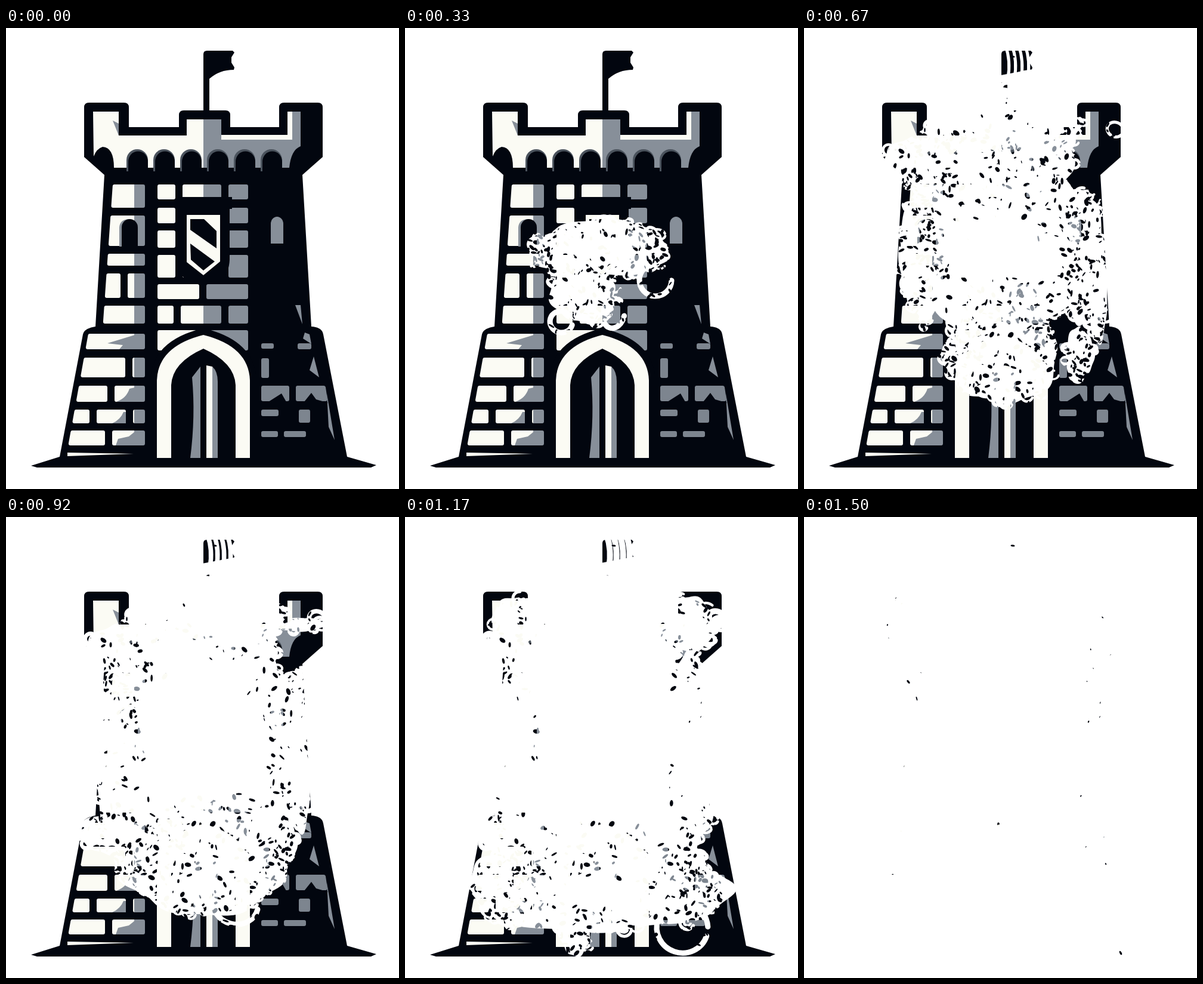
Animation of 659 by 772 pixels, one loop 1.58 s. Source, as an HTML page with a canvas:

```html
<!DOCTYPE html>
<html lang="en">
<head>
<meta charset="utf-8">
<title>Tower</title>
<style>
  html, body { margin: 0; width: 100%; height: 100%; overflow: hidden; background: #fff; }
  svg, canvas { position: absolute; left: 0; top: 0; width: 100%; height: 100%; display: block; }
  .ink { fill: #02060f; }
  .pale { fill: #fbfbf4; }
  .grey { fill: #878f99; }
  .brick { stroke-width: 6; stroke-linejoin: round; }
  .left { fill: url(#l); stroke: url(#l); }
  .mid { fill: url(#m); stroke: url(#m); }
  .dim { fill: #7d858f; stroke: #7d858f; }
</style>
</head>
<body>
<svg viewBox="0 0 659 772" preserveAspectRatio="none">
  <defs>
    <linearGradient id="l" gradientUnits="userSpaceOnUse" x1="0" x2="430" y1="0" y2="0">
      <stop offset=".5" stop-color="#fbfbf4"/><stop offset=".5" stop-color="#878f99"/>
    </linearGradient>
    <linearGradient id="m" gradientUnits="userSpaceOnUse" x1="0" x2="662" y1="0" y2="0">
      <stop offset=".5" stop-color="#fbfbf4"/><stop offset=".5" stop-color="#878f99"/>
    </linearGradient>
  </defs>

  <!-- flag and silhouette -->
  <path class="ink" d="M331 142V44Q331 38 337 38H380L383 41 378 49V58L383 66 382 70Q358 70 341 85V142Z"/>
  <path class="ink" d="M131 133Q131 125 139 125H198Q206 125 206 133V166H290V146Q290 138 298 138H368Q376 138 376 146V166H458V133Q458 125 466 125H523Q531 125 531 133V216L497 246 512 500Q530 501 532 513L572 718 621 732 612 736H52L42 733 90 718 129 513Q131 503 150 500L165 246 131 216Z"/>

  <!-- battlements -->
  <path class="pale" d="M146 140H189V180H303V153H331V234H181Q181 200 162 199 152 202 147 215Z"/>
  <path class="grey" d="M331 153H361V180H480V140H494V198Q478 204 475 234H331ZM179 155L189 160V180Z"/>
  <path class="pale" d="M361 179H472V140H480V187H361Z"/>
  <g id="arches"></g>

  <!-- left wall -->
  <path id="left" class="brick left"/>
  <path class="grey" d="M170 528L216 514V538H190L196 531ZM216 602V626H185Q202 620 207 604ZM201 643V662H178Q192 656 197 643ZM216 676V699H184L188 688 206 684Z"/>
  <path class="grey" d="M190 366V334Q191 320 207 320V366Z"/>
  <path class="ink" d="M194 368V334A13.500 14 0 0 1 221 334V368Z"/>
  <path class="pale" d="M103 711L214 713 103 717Z"/>

  <!-- middle wall and shield -->
  <path id="mid" class="brick mid"/>
  <path class="ink" d="M284 283H379V303H375V388Q374 410 362 420H300Q288 410 286 390V303H284Z"/>
  <path class="pale" d="M303 313H359V391L331 414 303 392Z"/>
  <path class="ink" d="M309 320H332L353 340V369L309 338ZM309 361L350 391 331 406 310 388Z"/>

  <!-- gate -->
  <g stroke="#02060f">
    <path class="ink" stroke-width="22" d="M253 709V590Q255 533 331 514 407 533 409 590V709Z"/>
  </g>
  <path class="pale" d="M253 720V590Q255 533 331 514 407 533 409 590V720H385V598Q383 560 331 537 279 560 277 598V720Z"/>
  <path class="grey" d="M309 720Q318 650 312 585L326 567V720ZM346 567Q355 575 355 592V720H346Z"/>
  <path class="pale" d="M336 565L346 567V720H336Z"/>

  <!-- right wall -->
  <path class="grey" d="M444 361V328A10.500 12 0 0 1 465 328V361ZM485 464H494L497 496ZM501 510L509 513 512 529 498 520ZM516 550L525 585 509 573ZM538 612L551 690 541 668Z"/>
  <path class="brick dim" d="M431 531H446V534H431ZM492 531H509V535H492ZM431 556H438V583H431ZM431 602H472V622H431ZM489 602H533L536 622H489ZM431 642H454V647H431ZM494 642H507V658H494ZM431 678H453V682H431ZM469 678H500V682H469Z"/>
  <path class="ink" d="M440 626L462 612 470 626ZM500 626L512 611 520 622 541 628Z"/>
</svg>
<canvas id="c" width="659" height="772"></canvas>
<script>
const $ = id => document.getElementById(id);
const ctx = $('c').getContext('2d');
const LOOP = 1580, LAST = 18, AXIS = 331, TAU = Math.PI * 2;

// Masonry: each row is [top, height, ...joints], laid between two wall edges
function lay(id, from, to, rows) {
  let d = '';
  for (const [y, h, ...joints] of rows) {
    const a = y + 3, b = y + h - 3;
    const ends = [null, ...joints, null];
    for (let i = 1; i < ends.length; i++) {
      const x0 = t => (ends[i - 1] ? ends[i - 1] + 6 : from(t)) + 3;
      const x1 = (ends[i] ? ends[i] - 6 : to) - 3;
      d += `M${x0(a)} ${a}H${x1}V${b}H${x0(b)}Z`;
    }
  }
  $(id).setAttribute('d', d);
}

lay('left', y => y < 500 ? 179 - .07 * (y - 262) : 138 - .18 * (y - 512), 233, [
  [262, 39], [314, 51], [378, 20], [411, 41, 198], [465, 30], [512, 26],
  [552, 33, 206], [599, 27, 176], [639, 23, 146, 207], [674, 25, 172]
]);
lay('mid', () => 254, 406, [
  [262, 25, 290, 367], [301, 26, 290, 367], [339, 29, 290, 367], [380, 38, 290, 367],
  [429, 25, 330], [465, 30, 287, 367], [506, 34]
]);

let arches = '<path class="ink" d="M202 234H458V250H202Z"/>';
for (let i = 0; i < 6; i++)
  arches += `<g transform="translate(${220 + 45 * i})">
    <path fill="#4b535d" d="M-18 240V221A18 18 0 0 1 18 221V240Z"/>
    <path class="ink" d="M-15 240V224A16 17 0 0 1 18 224V240Z"/></g>`;
$('arches').innerHTML = arches;

let seed = 11;
const rnd = (a = 0, b = 1) => {
  seed = (seed * 16807) % 2147483647;
  return a + (b - a) * seed / 2147483647;
};

// Wipes spread a little with age, crumbs show the tower until they expire
const wipes = [], crumbs = [];

function oval(x, y, rx, ry, turn = 0, end = TAU) {
  const path = new Path2D();
  path.ellipse(x, y, rx, ry, turn, 0, end);
  return path;
}

const crumb = (k, x, y, r) => crumbs.push({ k, path: oval(x, y, r, r * rnd(.25, .7), rnd(0, 3)) });

const ring = (k, x, y, rx, ry, w = 9) =>
  wipes.push({ k, w, path: oval(x, y, rx, ry, rnd(0, .5), rnd(4.5, TAU)) });

// Wavy wiped patch with loops along its rim and crumbs just inside
function burst(k, x, y, rx, ry) {
  const p = rnd(0, TAU), q = rnd(0, TAU), path = new Path2D();
  const at = (a, s) => {
    const r = s * (1 + .06 * Math.sin(3 * a + p) + .04 * Math.sin(8 * a + q));
    return [x + rx * r * Math.cos(a), y + ry * r * Math.sin(a)];
  };
  for (let a = 0; a < TAU; a += .06) path.lineTo(...at(a, 1));
  path.closePath();
  wipes.push({ k, w: 0, path });
  for (let n = (rx + ry) / 10; n > 0; n--) {
    const r = rnd(5, 12);
    ring(k, ...at(rnd(0, TAU), rnd(.92, 1.02)), r, r * rnd(.6, 1), rnd(3, 6));
    for (let i = 0; i < 2; i++)
      crumb(Math.min(LAST, k + Math.ceil(rnd(0, 4))), ...at(rnd(0, TAU), rnd(.72, .98)), rnd(1.5, 6));
  }
}

const pair = (k, dx, ...rest) => {
  burst(k, AXIS - dx, ...rest);
  burst(k, AXIS + dx, ...rest);
};

// Core opens from the shield, then the front sinks towards the ground
for (let k = 2; k <= 10; k++) burst(k, 325, 370, 185 * (1 - Math.exp(-k / 4)), 15 + 2 * k * k);
for (let k = 7; k <= 17; k++) {
  const t = k - 7;
  burst(k, AXIS, 523 + 14 * t, 75 + 19 * t, 97 - 3 * t);
}

// Side bursts: step, centre, radii
burst(4, 300, 445, 55, 50);
burst(4, 385, 368, 55, 32);
burst(5, 220, 345, 55, 52);
burst(5, 425, 355, 45, 65);
burst(6, 275, 225, 48, 52);
burst(6, 390, 168, 68, 50);
burst(6, 350, 152, 50, 54);
burst(6, 492, 440, 17, 85);
burst(6, 462, 545, 23, 42);
burst(7, AXIS, 163, 128, 52);
burst(7, 385, 225, 65, 70);
burst(8, 200, 220, 62, 42);
burst(8, 255, 235, 80, 65);
pair(8, 132, 380, 38, 110);
pair(10, 155, 390, 27, 130);
burst(10, 490, 180, 42, 11);
burst(11, 180, 530, 58, 36);
pair(13, 150, 395, 45, 165);
pair(13, 140, 180, 46, 46);
burst(14, 175, 620, 66, 62);
burst(14, 285, 690, 28, 44);
pair(15, 185, 600, 60, 90);
pair(16, 175, 180, 50, 80);
pair(17, 220, 700, 80, 60);

ring(4, 420, 422, 27, 27);
ring(4, 350, 478, 18, 25);
ring(4, 262, 492, 19, 18);
ring(6, 178, 428, 13, 13);
ring(8, 522, 170, 14, 12, 5);
ring(11, 385, 648, 38, 34);
ring(14, 465, 688, 43, 42);

// The flag frays into widening gaps
for (let x = 342; x < 385; x += 11)
  wipes.push({ k: 8, w: 5, path: new Path2D(`M${x - 4} 30Q${x + 5} 55 ${x} 84`) });
wipes.push({ k: 8, w: 12, path: new Path2D('M326 86L390 74') });

wipes.push({ k: LAST, w: 0, path: new Path2D('M0 0H659V772H0Z') });
for (let i = 0; i < 24; i++) {
  const side = i % 2 ? 1 : -1;
  crumb(LAST + 1, AXIS + side * rnd(125, 195), rnd(130, 600), rnd(.8, 2));
}
for (const [x, y] of [[350, 48], [175, 276], [189, 304], [326, 515], [531, 730]])
  crumb(LAST + 1, x, y, 3.5);

function draw(step) {
  ctx.globalCompositeOperation = 'source-over';
  ctx.clearRect(0, 0, 659, 772);
  ctx.fillStyle = ctx.strokeStyle = '#fff';
  ctx.lineCap = ctx.lineJoin = 'round';
  for (const { k, path, w } of wipes) {
    if (k > step) continue;
    ctx.lineWidth = w + .8 * (step - k) + .1;
    ctx.stroke(path);
    if (!w) ctx.fill(path);
  }
  ctx.globalCompositeOperation = 'destination-out';
  for (const { k, path } of crumbs) if (k > step) ctx.fill(path);
}

// Twelve steps a second, rounded to hundredths
const stepAt = t => {
  let k = 0;
  while (k < LAST && 10 * Math.round((k + 1) * 25 / 3) <= t) k++;
  return k;
};

let shown = -1;
const start = performance.now();
function tick() {
  const step = stepAt((performance.now() - start) % LOOP);
  if (step !== shown) draw(shown = step);
  requestAnimationFrame(tick);
}
tick();
</script>
</body>
</html>
```
